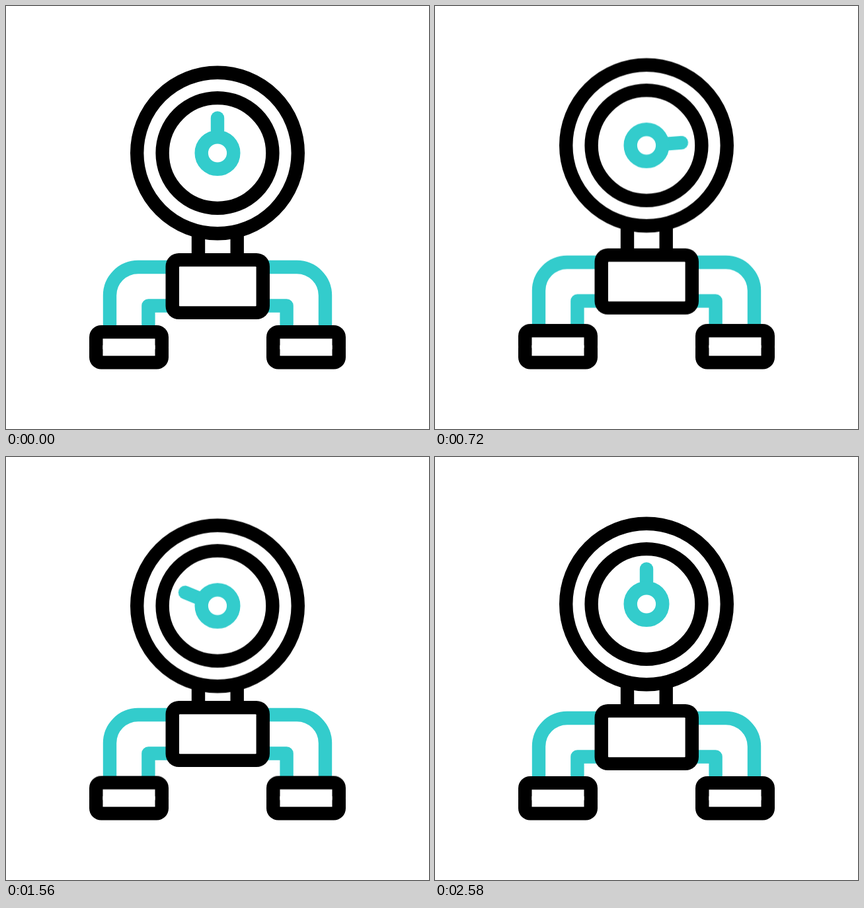
Animation, 640 px wide and 640 px high, one loop 2.8 s. Source, as an HTML page without scripts:

```html
<!DOCTYPE html>
<html lang="en">
<head>
<meta charset="utf-8">
<title>Pressure gauge</title>
<style>
  html, body { margin: 0; width: 100%; height: 100%; overflow: hidden; background: #fff; }
  svg { display: block; width: 100%; height: 100%; }

  .ink { fill: #000; }
  .paper { fill: #fff; }
  .line { fill: none; stroke: #000; stroke-width: 20.4; }
  .teal { stroke: #3cc; }

  .gauge, .body, .lid, .needle {
    animation: 2800ms cubic-bezier(.333, 0, .667, 1) infinite;
  }
  .gauge { animation-name: bounce; }
  .body { animation-name: sway; }
  .lid { animation-name: stretch; }
  .needle { animation-name: swing; transform-origin: 320px 222.5px; }

  @keyframes bounce {
    0%, 7.14% { transform: translateY(0); }
    11.43% { transform: translateY(10.7px); }
    34.29% { transform: translateY(-21.8px); }
    44.29% { transform: translateY(-24.2px); }
    60.71% { transform: translateY(10.2px); }
    72.86% { transform: translateY(-10.3px); }
    84.29%, 100% { transform: translateY(0); }
  }
  @keyframes sway {
    0%, 7.14% { transform: translateY(0); }
    11.43% { transform: translateY(3.1px); }
    37.14%, 45.71% { transform: translateY(-14.6px); }
    66.43% { transform: translateY(5.5px); }
    75.71% { transform: translateY(-3px); }
    84.29%, 100% { transform: translateY(0); }
  }
  @keyframes stretch {
    0%, 7.14% { transform: translateY(0); }
    11.43% { transform: translateY(1px); }
    37.14%, 44.29% { transform: translateY(-4px); }
    65.5% { transform: translateY(2.4px); }
    75.71% { transform: translateY(-1px); }
    84.29%, 100% { transform: translateY(0); }
  }
  @keyframes swing {
    0%, 7.14% { transform: rotate(0deg); }
    10.71% { transform: rotate(-5deg); }
    27.86%, 35.71% { transform: rotate(89.5deg); }
    61.43% { transform: rotate(-90deg); animation-timing-function: cubic-bezier(.333, 0, .5, 1); }
    92.14%, 100% { transform: rotate(0deg); }
  }
</style>
</head>
<body>
<svg viewBox="0 0 640 640">
  <defs>
    <g id="pipe" class="line teal" stroke-linejoin="round">
      <path d="M252 395H200A43 43 0 0 0 157 438V500"/>
      <path d="M252 453.5H215.4V500"/>
    </g>
    <rect id="cap" x="126" y="483" width="120" height="50" rx="18"/>
    <rect id="base" x="126" y="500" width="120" height="49.5" rx="18"/>
    <rect id="slot" x="146.5" y="503.3" width="79" height="16"/>
  </defs>

  <g class="gauge">
    <path class="line" d="M291 342V385M349.7 342V385"/>
    <circle class="line" cx="320" cy="222.5" r="121.8"/>
    <circle class="line" cx="320" cy="222.5" r="83.4"/>
    <path class="line teal needle" stroke-linecap="round" d="M320 169.5V190"/>
    <circle class="line teal" cx="320" cy="222.5" r="24.3"/>
  </g>

  <g class="body">
    <use href="#pipe"/>
    <use href="#pipe" transform="matrix(-1 0 0 1 640 0)"/>
    <rect class="ink" x="241.5" y="374" width="157.5" height="100" rx="20"/>
    <rect class="paper" x="262" y="394.2" width="116.6" height="60" rx="1"/>
  </g>

  <g class="ink lid">
    <use href="#cap"/>
    <use href="#cap" x="268"/>
  </g>
  <g class="ink">
    <use href="#base"/>
    <use href="#base" x="268"/>
  </g>
  <g class="paper lid">
    <use href="#slot"/>
    <use href="#slot" x="268"/>
  </g>
  <g class="paper">
    <use href="#slot" y="10"/>
    <use href="#slot" x="268" y="10"/>
  </g>
</svg>
</body>
</html>
```
